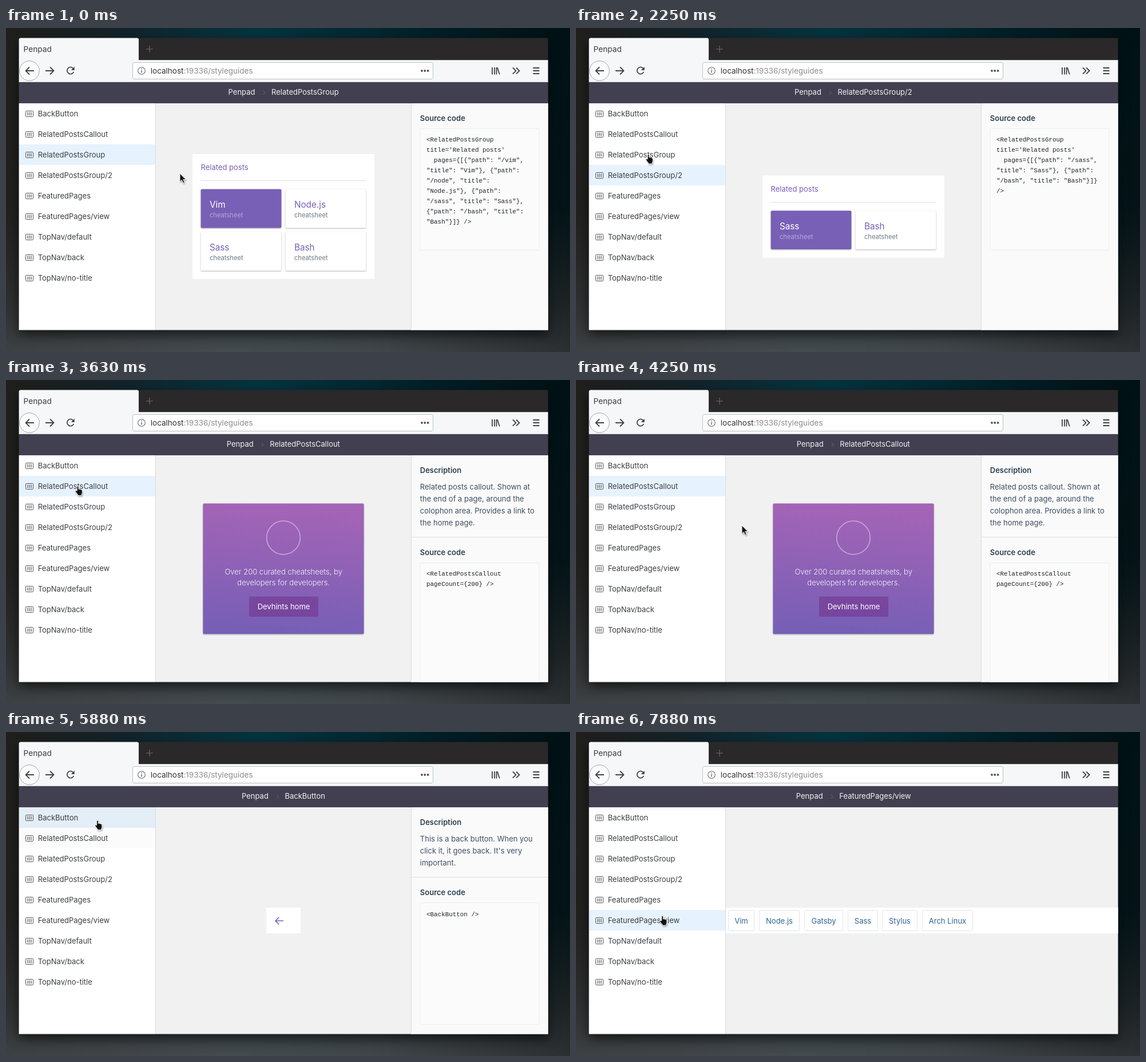
Write an HTML page that moves like this. It is 986 px wide and 568 px high and loops after 8 s.

```html
<!DOCTYPE html>
<html lang="en">
<head>
<meta charset="utf-8">
<title>Penpad</title>
<style>
  html, body { margin: 0; width: 100%; height: 100%; overflow: hidden; background: #17191b; }
  svg { display: block; width: 986px; height: 568px; font: 13px Inter, sans-serif; }
  text { white-space: pre; }
  .window { filter: drop-shadow(0 8px 10px rgba(0, 0, 0, .6)); }
  .code { font: 10.9px "Liberation Mono", monospace; fill: #1f2328; }
  .head { font-weight: 600; fill: #2c3e50; }
  .body { fill: #3f4f60; }
  .tile { filter: drop-shadow(0 1px 1px rgba(0, 0, 0, .3)); }
  .line { fill: none; stroke: #444; stroke-width: 1.8; }
  .cursor { filter: drop-shadow(1px 2px 1px rgba(0, 0, 0, .3)); }
</style>
</head>
<body>
<svg id="stage" viewBox="0 0 986 568"></svg>
<script>
const STEP = 125, STEPS = 64;
const PURPLE = '#7760b5', BLUE = '#e6f2fe';
const LEFT = 22.6, RIGHT = 947.6, TOP = 17.6, BOTTOM = 529.5;
const ROWS = ['BackButton', 'RelatedPostsCallout', 'RelatedPostsGroup', 'RelatedPostsGroup/2',
  'FeaturedPages', 'FeaturedPages/view', 'TopNav/default', 'TopNav/back', 'TopNav/no-title'];

const rect = (x, y, w, h, fill, more = '') =>
  `<rect x="${x}" y="${y}" width="${w}" height="${h}" fill="${fill}" ${more}/>`;
const text = (x, y, s, more = '') =>
  `<text x="${x}" y="${y}" ${more}>${s.replace(/</g, '&lt;').replace(/>/g, '&gt;')}</text>`;
const lines = (x, y, gap, list, more) => list.map((s, i) => text(x, y + i * gap, s, more)).join('');
const path = (d, more = 'class="line"') => `<path d="${d}" ${more}/>`;
const gradient = (id, vector, ...stops) => `<linearGradient id="${id}" ${vector}>` +
  stops.map(([at, c, a = 1]) => `<stop offset="${at}" stop-color="${c}" stop-opacity="${a}"/>`).join('') +
  '</linearGradient>';

function backdrop() {
  const down = 'x1="0" y1="0" x2="0" y2="1"', tilt = 'x1=".54" y1="0" x2=".46" y2="1"';
  return '<defs>' +
    gradient('sky', '', [0, '#25231f'], [.18, '#14242a'], [.45, '#053440'], [.7, '#03272f'], [1, '#001a20']) +
    gradient('ground', down, [0, '#3a3d40', 0], [.55, '#303335', .1], [.85, '#3a3d3f', .75], [1, '#484c4f', .95]) +
    gradient('dusk', '', [0, '#000', .12], [.4, '#000', 0], [.65, '#000', .05], [1, '#000', .35]) +
    gradient('card', tilt, [0, '#a564b6'], [1, '#765fb6']) +
    gradient('cardHover', tilt, [0, '#b26dc8'], [1, '#8168c7']) +
    `<clipPath id="pane"><path d="M${LEFT} 95H${RIGHT}V${BOTTOM}H${LEFT}z"/></clipPath></defs>` +
    ['sky', 'ground', 'dusk'].map(id => rect(0, 0, 986, 568, `url(#${id})`)).join('');
}

function browser() {
  const width = RIGHT - LEFT;
  const dots = [727, 732.3, 737.6].map(x => `<circle cx="${x}" cy="75" r="1.9" fill="#555"/>`).join('');
  return `<g class="window">${rect(LEFT, TOP, width, BOTTOM - TOP, '#2b2829', 'rx="2"')}</g>` +
    path(`M${LEFT} 57V${TOP + 3}q0-3 3-3H229q3 0 3 3V57z`, 'fill="#f5f7f9"') +
    text(30.6, 42, 'Penpad', 'font-size="13.7" fill="#3c3c3c"') +
    path('M245 37h12M251 31v12', 'stroke="#5a5758" stroke-width="1.6"') +
    rect(LEFT, 56.2, width, 39, '#f5f7f9') +
    '<circle cx="41" cy="75" r="17.3" fill="#fafbfc" stroke="#a3a5a5"/>' +
    path('M49 75H34.5M41 68.5L34.5 75L41 81.5') +
    path('M69 75H83.5M77 68.5L83.5 75L77 81.5') +
    path('M117.8 71.3A6 6 0 1 0 118.3 77') +
    path('M119.7 68v6h-6z', 'fill="#444"') +
    rect(221.5, 60.5, 525, 29, '#fff', 'rx="2" stroke="#b4c5c0"') +
    '<circle cx="237" cy="75" r="6.3" fill="none" stroke="#666" stroke-width="1.1"/>' +
    path('M237 74v4.5M237 71v1.5', 'stroke="#666" stroke-width="1.4"') +
    `<text x="252.8" y="80.3" font-size="13.5" fill="#333">localhost<tspan fill="#8d8d8d">:19336/styleguides</tspan></text>` +
    dots +
    path('M850 69v12.5M854 69v12.5M857.5 69v12.5M859 69.2l3.8 12') +
    path('M886 69.5l5.5 5.5l-5.5 5.5M892 69.5l5.5 5.5l-5.5 5.5') +
    path('M921.5 70h11M921.5 75h11M921.5 80h11') +
    rect(LEFT, 94, width, 1, '#d5d7d9') +
    rect(LEFT, 95, width, 37.5, '#424050');
}

function sidebar() {
  return rect(22, 132, 239, 398, '#fff') + rect(261, 132, 1, 398, '#dcdcdc') +
    rect(262, 132, 686, 398, '#f1f1f1') +
    ROWS.map((name, i) => {
      const y = 132 + 36 * i;
      return rect(23, y, 238, 36, BLUE, `id="row${i}"`) +
        rect(34.5, y + 13.5, 13, 10, 'none', 'rx="1" stroke="#555"') +
        path(`M38 ${y + 15.5}v6M41 ${y + 15.5}v6M44 ${y + 15.5}v6`, 'stroke="#555" stroke-width="1.2"') +
        text(55.7, y + 22.8, name, 'fill="#3d3f42"');
    }).join('');
}

const crumbs = (x, title) => text(x, 117.4, 'Penpad', 'fill="#f1f1f4"') +
  path(`M${x + 61} 109.5l3.5 3.5l-3.5 3.5`, 'fill="none" stroke="#6c6a79"') +
  text(x + 75.5, 117.4, title, 'fill="#f1f1f4"');

function panel(code, description) {
  let y = 132, out = rect(708, 132, 240, 398, '#fafafa') + rect(708, 132, 1, 398, '#dcdcdc');
  if (description) {
    out += text(723.8, 163, 'Description', 'class="head"') +
      lines(723.8, 192.2, 20.8, description, 'class="body"');
    y += 60.8 + 20.8 * description.length;
    out += rect(709, Math.round(y) - 1, 239, 1, '#dedede');
  }
  return out + text(723.8, y + 31, 'Source code', 'class="head"') +
    rect(724, Math.round(y) + 44.5, 208, 213, '#fbfbfb', 'rx="2" stroke="#eeeeee"') +
    lines(735, y + 67.3, 18, code, 'class="code"');
}

function tile(x, y, name, filled) {
  return rect(x - .4, y - .4, 140.8, 67.8, filled ? PURPLE : '#fff', 'class="tile" rx="2"') +
    text(x + 14.9, y + 32, name, `font-size="15.3" fill="${filled ? '#fff' : PURPLE}"`) +
    text(x + 14.9, y + 49, 'cheatsheet', `font-size="11.2" fill="${filled ? '#b7a6db' : '#6f7984'}"`);
}

function posts(top, names) {
  const height = names.length > 2 ? 219 : 144;
  return rect(326, top, 318, height, '#fff') +
    text(340.5, top + 28, 'Related posts', `fill="${PURPLE}"`) +
    rect(341, Math.round(top + 46), 288, 1, '#dddddd') +
    names.map((n, i) => tile(341 + 148 * (i % 2), top + 62 + 75 * (i >> 1), n, i === 0)).join('');
}

function callout() {
  const card = fill => more => rect(344.4, 216.6, 281.2, 228.6, `url(#${fill})`, 'rx="2" ' + more);
  const middle = 'text-anchor="middle"';
  return card('card')('class="tile"') + card('cardHover')('id="glow"') +
    '<circle cx="485" cy="276.5" r="29.3" fill="none" stroke="#fff" stroke-opacity=".4" stroke-width="1.8"/>' +
    lines(485.2, 341.3, 18.7, ['Over 200 curated cheatsheets, by', 'developers for developers.'],
      middle + ' fill="#fff" fill-opacity=".92" font-weight="300"') +
    rect(425, 379.5, 121, 35.5, '#733a92', 'rx="2" fill-opacity=".65"') +
    text(485.5, 402.2, 'Devhints home', middle + ' fill="#fff"');
}

function chips() {
  const list = [['Vim', 266, 46], ['Node.js', 320, 71], ['Gatsby', 399, 68],
    ['Sass', 475, 53], ['Stylus', 535, 62], ['Arch Linux', 605, 89]];
  return rect(262, 308, 686, 45, '#fff') + list.map(([name, x, w]) =>
    rect(x + .5, 312.5, w - 1, 36, '#fff', 'rx="2" stroke="#e2e4e6"') +
    text(x + w / 2, 335.6, name, 'text-anchor="middle" fill="#2c6496"')).join('');
}

// Each page: first step, its sidebar row, and what it shows.
const PAGES = [
  { from: 0, row: 2, art: crumbs(388.6, ROWS[2]) + posts(221, ['Vim', 'Node.js', 'Sass', 'Bash']) +
    panel(['<RelatedPostsGroup', "title='Related posts'", '  pages={[{"path": "/vim",',
      '"title": "Vim"}, {"path":', '"/node", "title":', '"Node.js"}, {"path":',
      '"/sass", "title": "Sass"},', '{"path": "/bash", "title":', '"Bash"}]} />']) },
  { from: 14, row: 3, art: crumbs(382, ROWS[3]) + posts(258.7, ['Sass', 'Bash']) +
    panel(['<RelatedPostsGroup', "title='Related posts'", '  pages={[{"path": "/sass",',
      '"title": "Sass"}, {"path":', '"/bash", "title": "Bash"}]}', '/>']) },
  { from: 29, row: 1, art: crumbs(385.8, ROWS[1]) + callout() +
    panel(['<RelatedPostsCallout', 'pageCount={200} />'],
      ['Related posts callout. Shown at', 'the end of a page, around the',
        'colophon area. Provides a link to', 'the home page.']) },
  { from: 47, row: 0, art: crumbs(412, ROWS[0]) + rect(455, 308, 60, 45, '#fff') +
    path('M485 331H471M477.3 324.7L471 331L477.3 337.3', `fill="none" stroke="${PURPLE}" stroke-width="1.5"`) +
    panel(['<BackButton />'],
      ['This is a back button. When you', "click it, it goes back. It's very", 'important.']) },
  { from: 56, row: 5, art: crumbs(384.8, ROWS[5]) + chips() }
];

// Cursor stops: step, x, y.
const TRACK = [[0, 304, 255], [5, 124, 200], [8, 124, 243], [11, 124, 252], [14, 124, 252],
  [18, 121.5, 221], [20, 120.5, 186], [21, 120.5, 185.5], [30, 120.5, 185.5], [37, 400, 300],
  [40, 434, 338.5], [44, 155, 154.5], [50, 155, 154.5], [54, 146, 322], [STEPS, 146, 322]];

const status = rect(22.5, 507.5, 109, 22, '#f1f2f3', 'stroke="#c3c5c7"') +
  text(25.8, 523.8, 'localhost:19336', 'font-size="13.5" fill="#3c3c3c"');
const outline = 'fill="#111" stroke="#fff" stroke-width=".9" stroke-linejoin="round"';
const hand = path('M3.6 9V1.8a1.4 1.4 0 0 1 2.8 0V6q1.3-1 2.4.2 1.4-.6 2.2.6 1.8-.2 1.8 1.6v3.2' +
  'q0 1.6-1 3.4v2H4.9v-1.6Q2.6 13 .7 9.8q-.4-1.6 1.2-1.6z', outline + ' id="hand"');
const arrow = path('M0 0V14.5l3.3-3 2.3 5.3 2.5-1-2.3-5.2h4.6z', outline + ' id="arrow"');

document.getElementById('stage').innerHTML = backdrop() + browser() + '<g clip-path="url(#pane)">' + sidebar() +
  PAGES.map((p, i) => `<g id="page${i}">${p.art}</g>`).join('') + '</g>' +
  `<g id="status">${status}</g><g id="cursor" class="cursor">${hand}${arrow}</g>`;

const el = id => document.getElementById(id);
const show = (id, on) => { el(id).style.display = on ? '' : 'none'; };
const clamp = v => Math.max(0, Math.min(1, v));

function cursorAt(n) {
  const i = TRACK.findIndex(stop => stop[0] > n);
  const [a, ax, ay] = TRACK[i - 1], [b, bx, by] = TRACK[i];
  const u = (n - a) / (b - a), k = u * u * (3 - 2 * u);
  return [ax + (bx - ax) * k, ay + (by - ay) * k];
}

function render(ms) {
  const n = Math.floor(ms / STEP) % STEPS;
  const page = PAGES.findLastIndex(p => p.from <= n);
  const active = PAGES[page].row;
  const fading = n === 47;
  PAGES.forEach((p, i) => show('page' + i, i === page));
  ROWS.forEach((name, i) => {
    const masked = i === 2 && n >= 6 && n <= 8;
    const pressed = i === 1 && n >= 24 && n < 29;
    show('row' + i, (i === active && !masked) || pressed || (i === 1 && fading));
  });
  el('row0').setAttribute('fill', fading ? '#e3eef7' : BLUE);
  el('row1').setAttribute('fill', fading ? '#fbfbfb' : BLUE);
  el('glow').style.opacity = clamp((n - 35) / 2) * clamp((43 - n) / 2);
  show('status', n >= 38 && n < 45);

  const [x, y] = cursorAt(n);
  const pointing = x < 256 || (page === 2 && x > 340 && y > 213);
  el('cursor').setAttribute('transform', `translate(${x} ${y})`);
  show('hand', pointing);
  show('arrow', !pointing);
}

const start = performance.now();
function tick() {
  render(performance.now() - start);
  requestAnimationFrame(tick);
}
tick();
</script>
</body>
</html>
```
